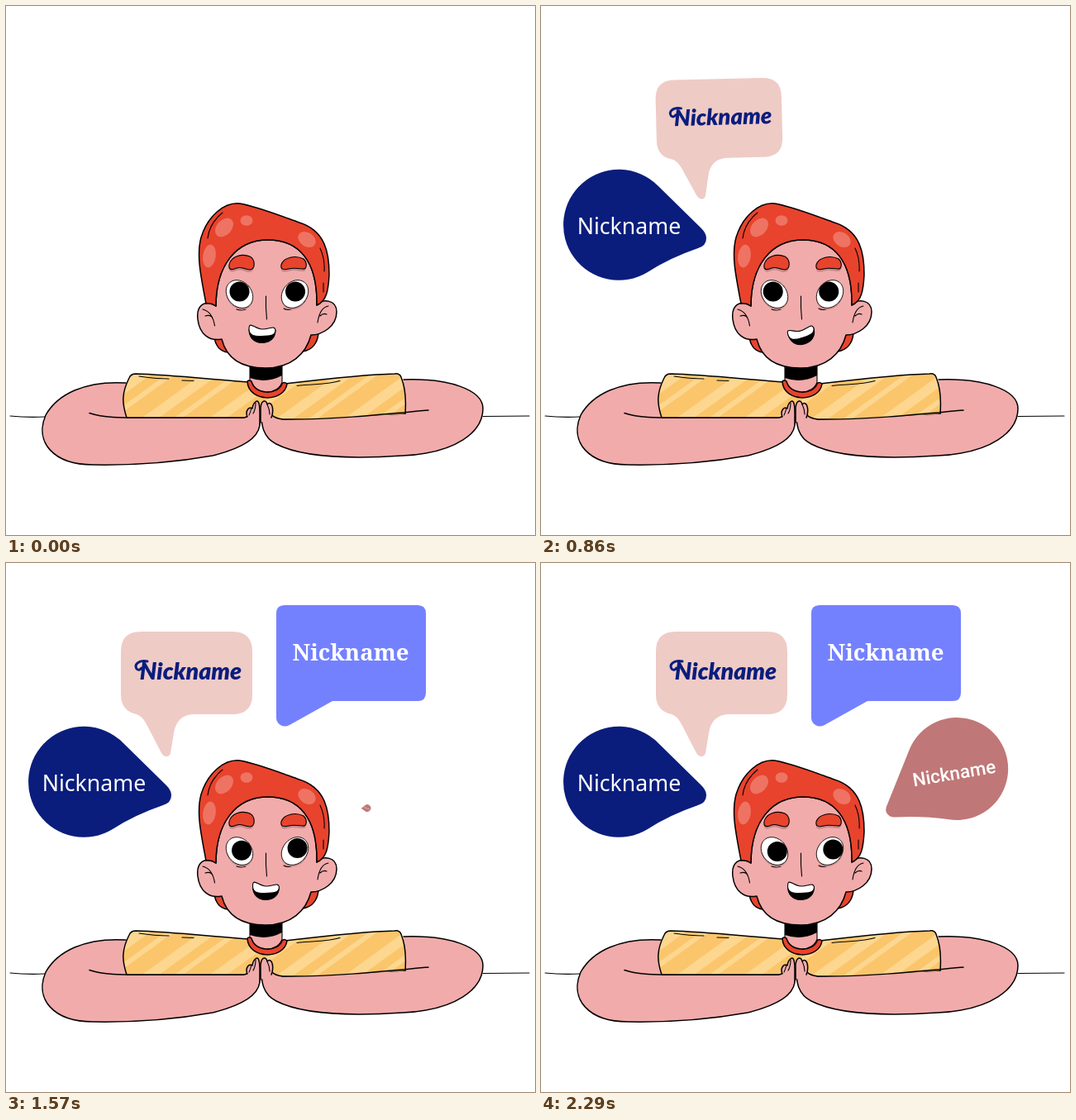
Recreate the animation shown at these times as an HTML page. Size 640 px wide and 640 px high, loop 2780 ms.

```html
<!DOCTYPE html>
<html lang="en">
<head>
<meta charset="utf-8">
<title>Nickname</title>
<style>
  html, body { margin: 0; width: 100%; height: 100%; overflow: hidden; background: #fff; }
  svg { display: block; width: 100vw; height: 100vh; }
  .ink { stroke: #000; stroke-width: 1.5; stroke-linecap: round; stroke-linejoin: round; }
  .thin { stroke-width: 1.1; }
  .skin { fill: #f1abab; }
  .hair { fill: #e8432d; }
  .line { fill: none; }
  .shade { fill: #c88a8c; }
  text { text-anchor: middle; }
</style>
</head>
<body>
<svg viewBox="0 0 640 640">
  <defs>
    <path id="shirt" d="M146 498C140 480 140 468 149 450Q151 445 157 445C200 446 250 452 294 455L338 457C380 452 430 446 470 445Q476 444 478 449Q485 466 483 493C450 495 385 501 335 500L320 496L292 498Z"/>
    <clipPath id="shirtClip"><use href="#shirt"/></clipPath>
    <ellipse id="leftShape" cx="282.5" cy="348.5" rx="14.7" ry="18.3" transform="rotate(-40 282.5 348.5)"/>
    <ellipse id="rightShape" cx="349.5" cy="348.5" rx="14.7" ry="18.3" transform="rotate(40 349.5 348.5)"/>
    <clipPath id="leftEye"><use href="#leftShape"/></clipPath>
    <clipPath id="rightEye"><use href="#rightShape"/></clipPath>
    <g id="browPair">
      <path d="M270 313C272 303 285 299 295 303C302 307 302 318 295 319C288 319 286 315 279 317C273 320 269 319 270 313Z"/>
      <path d="M333 313C336 304 350 301 360 306C365 311 364 319 359 318C352 318 349 316 342 318C335 320 332 318 333 313Z"/>
    </g>
  </defs>

  <path class="ink line thin" d="M5 496Q25 498 47 497M577 496.5L633 496"/>

  <!-- Arms -->
  <path class="ink skin" d="M145 456C95 453 62 470 48 495C34 528 58 555 105 555C160 556 205 552 250 544C290 534 307 520 307 505V488L287 498H146"/>
  <path class="ink skin" d="M481 452C535 450 577 464 577 487C577 515 545 541 480 544C420 548 360 547 327 530C311 522 309 508 308 488L335 500L483 493"/>

  <!-- Shirt -->
  <use href="#shirt" fill="#fbc56b"/>
  <g id="stripes" clip-path="url(#shirtClip)" stroke="#fdd78f"></g>
  <path class="ink line" d="M146 498C140 480 140 468 149 450Q151 445 157 445C200 446 250 452 294 455M338 457C380 452 430 446 470 445Q476 444 478 449Q485 466 483 493M101 492.5C120 499 145 498 180 498H287Q292 498 293 494M511 489C450 495 385 501 335 500Q325 499 321 494"/>
  <path class="ink line thin" d="M161 448Q180 451 197 451M213 453L227 453.5M352 459.5C375 457 390 458 404 453.5"/>

  <!-- Neck and collar -->
  <path class="ink skin thin" d="M295 434V455C302 472 330 470 334 455V434Z"/>
  <path d="M295 434H334V447Q315 457 295 450Z"/>
  <path class="ink hair" d="M292 454C293 480 337 480 340 457Q336 454 334 457C329 471 301 471 297 454Q294 452 292 454Z"/>

  <!-- Hands -->
  <path class="ink skin" d="M292 497C289 490 294 484 298 487C299 479 305 475 306 481Q307 484 307 492V506"/>
  <path class="ink skin" d="M308 504V486C309 476 315 476 316 482C321 477 324 486 322 495L321 498"/>
  <path class="ink line thin" d="M294 495Q296 491 297 486M299 493Q302 488 302 480M316 482Q319 488 319 494"/>

  <!-- Head -->
  <path class="ink hair" d="M252 402Q256 420 272 419L268 400ZM378 396Q376 415 359 418L364 398Z"/>
  <path class="ink skin" d="M254 363C240 355 230 362 232 379C234 397 246 406 261 403C267 427 285 438 314 438C345 438 363 421 369 398C382 398 400 388 400 370C400 356 384 353 376 362C377 309 355 283 317 283C278 283 254 314 254 363Z"/>
  <path class="ink hair" d="M242 360C236 328 230 302 236 280C244 254 264 237 283 239C302 242 330 253 355 262C387 272 391 300 391 325C390 344 388 357 376 362C377 309 355 283 317 283C278 283 254 314 254 363Q248 359 242 360Z"/>
  <g fill="#ee7362">
    <ellipse cx="264" cy="268" rx="9" ry="13" transform="rotate(42 264 268)"/>
    <ellipse cx="291" cy="259.5" rx="7.5" ry="6.3"/>
    <ellipse cx="364" cy="282.5" rx="11.5" ry="8.5" transform="rotate(35 364 282.5)"/>
    <ellipse cx="246" cy="302.5" rx="7.8" ry="14" transform="rotate(8 246 302.5)"/>
  </g>
  <path class="ink line thin" d="M244 281Q246 263 262 250M380 293Q386 306 385 321M384 335V346M238 367Q250 370 252.5 387M241 375Q248 373 250 378M377 383C379 369 384 364 390 363M380 375Q384 371 388 373M314.5 351V365L315.5 379M279 367Q284 369 290 367M336 366Q341 369 347 366"/>

  <!-- Brows and eyes -->
  <use href="#browPair" class="shade" y="3"/>
  <use href="#browPair" class="hair ink thin"/>
  <g class="shade"><use href="#leftShape" y="2"/><use href="#rightShape" y="2"/></g>
  <g class="ink" fill="#fff" style="stroke-width:.8"><use href="#leftShape"/><use href="#rightShape"/></g>
  <g clip-path="url(#leftEye)"><circle id="leftPupil" r="12"/></g>
  <g clip-path="url(#rightEye)"><circle id="rightPupil" r="12"/></g>

  <!-- Mouth -->
  <g id="mouth" class="ink thin">
    <path d="M294 391C294 400 299 407.5 310 407.5S326 400 326 392Z"/>
    <path fill="#fff" d="M294 391C294 380 301 391 310 391S325 386 326 392C326 399 319 399.5 309 399.5S294 398 294 391Z"/>
  </g>

  <!-- Speech bubbles -->
  <g class="bubble" fill="#0a1d7c">
    <path d="M141 217A67 67 0 1 0 129 322Q155 305 190 293Q200 290 200 281Q200 275 194 269Z"/>
    <text x="106.5" y="276" fill="#fff" font-family="'Noto Sans','Open Sans',sans-serif" font-size="26.7">Nickname</text>
  </g>
  <g class="bubble" fill="#efcbc6">
    <path d="M163 83H274Q298 83 298 107V159Q298 183 274 183H227Q206 184 203 206L199 230Q198 234 194 234Q190 234 187 228L171 197Q165 185 158 183Q139 179 139 159V107Q139 83 163 83Z"/>
    <path d="M171 119C160 117 155 123 158 128Q161 131 164 127" fill="none" stroke="#0a1d7c" stroke-width="3" stroke-linecap="round"/>
    <text x="223.5" y="141" fill="#0a1d7c" font-family="Lato,sans-serif" font-style="italic" font-weight="900" font-size="28.5">Nickname</text>
  </g>
  <g class="bubble" fill="#7481ff">
    <path d="M337 51H498Q508 51 508 61V157Q508 167 498 167H395L343 196Q337 199 332 196Q327 193 327 187V61Q327 51 337 51Z"/>
    <text x="417" y="117.5" fill="#fff" font-family="'Noto Serif',serif" font-weight="700" font-size="27.5">Nickname</text>
  </g>
  <g class="bubble" fill="#c07777">
    <path d="M446 225A62 62 0 1 1 492 310Q463 306 429 307.5Q421 308 418 302Q416 298 419 292Z"/>
    <text transform="translate(501 262) rotate(-9.5)" fill="#fff" font-family="Roboto,sans-serif" font-weight="500" font-size="22.5">Nickname</text>
  </g>
</svg>
<script>
const LOOP = 2780, STEP = 1000 / 14, LAST = 32;
const PEAK = 1.045, SETTLE = .4;
const $ = id => document.getElementById(id);
const clamp = v => Math.min(1, Math.max(0, v));
const ease = v => { const k = clamp(v); return k * k * (3 - 2 * k); };
const place = (node, ...parts) => node.setAttribute('transform', parts.join(' '));

const stripe = (x, width) => `<path d="M${x} 498l90-65M${x} 498l-14 10" stroke-width="${width}"/>`;
for (let x = 93; x < 480; x += 82) $('stripes').innerHTML += stripe(x, 12) + stripe(x + 34, 6);

// Times are in animation steps
const bubbles = [
  { x: 182, y: 278, start: 0, grow: 6, tilt: 30 },
  { x: 194, y: 221, start: 6.5, grow: 6, tilt: 9 },
  { x: 342, y: 188, start: 13, grow: 6, tilt: 12.5 },
  { x: 431, y: 297, start: 21.5, grow: 7.5, tilt: 30 }
];
const bubbleNodes = document.querySelectorAll('.bubble');

// Grows at a steady rate past full size while swinging, then settles
function drawBubble({ x, y, start, grow, tilt }, node, t) {
  const u = Math.max(0, (t - start) / grow);
  const rest = clamp((u - 1) / SETTLE);
  const scale = u < 1 ? PEAK * u : PEAK + (1 - PEAK) * rest;
  const turn = tilt * Math.cos(Math.PI * .6 * Math.min(u, 1)) * (1 - rest);
  place(node, `translate(${x} ${y})`, `rotate(${turn})`, `scale(${scale})`, `translate(${-x} ${-y})`);
}

function draw(t) {
  bubbles.forEach((bubble, i) => drawBubble(bubble, bubbleNodes[i], t));

  // The eyes glance left, then follow the bubbles to the right
  const left = ease(t / 4), right = ease((t - 8) / 18);
  const glance = 5.8 * right - 2.5 * left;
  const leftY = 345.5 + 3.5 * ease((t - 14) / 13);
  const rightY = 345.5 + 2.3 * left - 2.8 * ease((t - 4) / 11) + 1.5 * ease((t - 22) / 6);
  place($('leftPupil'), `translate(${282.5 + glance} ${leftY})`);
  place($('rightPupil'), `translate(${350 + glance} ${rightY})`);

  const sway = Math.sin(Math.PI * clamp(t / 21));
  place($('mouth'), `translate(${4.5 * ease(t / 9)} ${2 * sway})`, `rotate(${-18 * sway} 310 392)`);
}

const start = performance.now();
function tick() {
  const time = (performance.now() - start) % LOOP;
  draw(Math.min(LAST, Math.floor((time + 5) / STEP)));
  requestAnimationFrame(tick);
}
tick();
</script>
</body>
</html>
```
